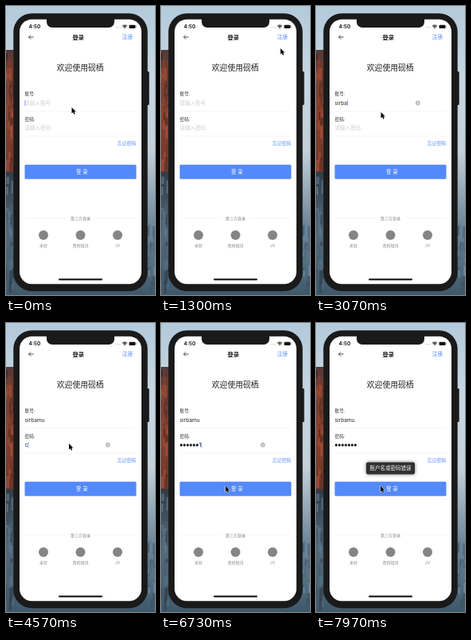
An HTML page with a canvas for the animation above (8000 ms loop, 187x362 px).

```html
<!DOCTYPE html>
<html lang="zh-CN">
<head>
<meta charset="utf-8">
<title>登录</title>
<style>
html, body { margin: 0; width: 100%; height: 100%; overflow: hidden; background: #a9bfce; }
canvas { display: block; width: 187px; height: 362px; }
</style>
</head>
<body>
<canvas id="stage"></canvas>
<script>
const W = 187, H = 362, LOOP = 8000;
const BLUE = '#5489fb', INK = '#222', SHELL = '#1a1a1b';
const FONT = 'Inter, "Noto Sans CJK SC", "Noto Sans CJK", sans-serif';
const USER = { word: 'sirbamu', start: 2430, gap: 160 };
const PASS = { word: 'cabmer1', start: 4570, gap: 280 };
const FOCUS_PASS = 4380, SUBMIT = 7370;
const HOME = { x: 82.5, y: 127 };
const MOVES = [
  { at: 870, ms: 420, x: 150, y: 53 },
  { at: 1930, ms: 270, x: 81.5, y: 133 },
  { at: 3970, ms: 230, x: 79, y: 151 },
  { at: 6530, ms: 190, x: 81, y: 204 }
];
const ARROW = new Path2D('M0 0V7.5L1.7 6L2.9 8.7L4.2 8.1L3 5.5L5.3 5.4Z');

const canvas = document.getElementById('stage');
const g = canvas.getContext('2d');
const dpr = window.devicePixelRatio || 1;
canvas.width = W * dpr;
canvas.height = H * dpr;

const clamp = v => Math.max(0, Math.min(1, v));
const smooth = v => v * v * (3 - 2 * v);

function seeded(seed) {
  return () => (seed = (seed * 16807) % 2147483647) / 2147483647;
}

function box(x, y, w, h, r, fill) {
  g.beginPath();
  g.roundRect(x, y, w, h, r);
  g.fillStyle = fill;
  g.fill();
}

function disc(x, y, r, fill) {
  g.beginPath();
  g.arc(x, y, r, 0, Math.PI * 2);
  g.fillStyle = fill;
  g.fill();
}

function line(x1, y1, x2, y2, color, width) {
  g.beginPath();
  g.moveTo(x1, y1);
  g.lineTo(x2, y2);
  g.strokeStyle = color;
  g.lineWidth = width;
  g.stroke();
}

function text(s, x, y, size, color, align = 'left', weight = 400) {
  g.font = `${weight} ${size}px ${FONT}`;
  g.textAlign = align;
  g.fillStyle = color;
  g.fillText(s, x, y + size * .37);
}

function gradient(y, h, ...colors) {
  const fill = g.createLinearGradient(0, y, 0, y + h);
  colors.forEach((c, i) => fill.addColorStop(i / (colors.length - 1), c));
  return fill;
}

// Random rock streaks inside a rectangle.
function rocks(rand, x, y, w, h, count, hue, sat, dark, light) {
  for (let i = 0; i < count; i++) {
    const l = dark + (light - dark) * rand();
    g.fillStyle = `hsla(${hue}, ${sat}%, ${l}%, .6)`;
    g.fillRect(x + rand() * w, y + rand() * h, 1 + rand() * 3, 4 + rand() * 14);
  }
}

function wallpaper() {
  const rand = seeded(11);
  g.fillStyle = gradient(0, H, '#b3cadb', '#c6d6e1', '#c3d0da', '#71899b', '#3e586b');
  g.fillRect(0, 0, W, H);
  g.fillStyle = gradient(55, 155, '#54393a', '#8c4331', '#6b352c');
  g.fillRect(0, 55, 12, 155);
  rocks(rand, -1, 55, 12, 140, 50, 14, 50, 15, 48);
  g.fillStyle = gradient(208, 154, '#2f3c48', '#526a7b', '#3e586b');
  g.fillRect(0, 208, 12, 154);
  rocks(rand, -1, 208, 12, 140, 30, 207, 20, 20, 55);
  rocks(rand, 176, 270, 11, 80, 24, 207, 22, 22, 65);
}

function phone() {
  box(176.5, 82, 3.2, 42, 1, SHELL);
  box(9.3, 9.2, 168.4, 348, 23, SHELL);
  box(17, 16.8, 153, 331.4, 15.5, '#fff');
  box(51, 16, 85, 11, [0, 0, 7, 7], SHELL);
}

function statusBar() {
  text('4:50', 36, 25.6, 6.6, '#111', 'center', 600);
  for (let i = 0; i < 4; i++) disc(138.2 + i * 1.8, 26.8, .5, '#aaa');
  for (let r = 1.4; r < 5; r += 1.5) {
    g.beginPath();
    g.arc(149, 28.4, r, -Math.PI * .75, -Math.PI * .25);
    g.strokeStyle = '#111';
    g.lineWidth = 1;
    g.stroke();
  }
  box(154.5, 23.8, 8, 4.2, 1.1, '#111');
  box(163, 25.1, .7, 1.6, .3, '#777');
}

function page() {
  line(34.6, 39, 28.6, 39, INK, .8);
  for (const d of [-2.6, 2.6]) line(28.5, 39, 31.1, 39 + d, INK, .8);
  text('登录', 90.8, 39, 7.2, INK, 'center', 600);
  text('注册', 152.5, 39, 6.7, BLUE, 'center');
  text('欢迎使用砚栖', 93.2, 77, 9.8, INK, 'center');
  text('账号:', 23.5, 109.8, 5.7, '#333');
  text('密码:', 23.5, 141.4, 5.7, '#333');
  for (const y of [132, 163]) line(24, y, 163, y, '#e8e8e8', .5);
  text('忘记密码', 163.2, 171.4, 5.9, BLUE, 'right');
  box(23.5, 198.8, 140, 18, 1.5, BLUE);
  text('登 录', 95.3, 208, 6.4, '#fff', 'center');
  for (const x of [24, 111]) line(x, 266, x + 52, 266, '#ececec', .5);
  text('第三方登录', 93.5, 266, 5, '#888', 'center');
  ['禾铃', '青桥短讯', 'JV'].forEach((name, i) => {
    const x = 47 + i * 46.5;
    disc(x, 287, 6, '#858585');
    text(name, x, 300.5, 5, '#888', 'center');
  });
  box(66, 341.6, 55, 2, 1, '#050505');
}

function clearIcon(y) {
  disc(127.8, y, 2.9, '#bcbcbc');
  for (const d of [-1.1, 1.1]) line(127.8 - d, y - 1.1, 127.8 + d, y + 1.1, '#fff', .6);
}

// Fades in, holds and fades out again, counted from the last key press.
function caret(x, y, age) {
  const p = (age + 120) % 720;
  g.globalAlpha = clamp(Math.min(p, 720 - p) / 170);
  g.fillStyle = '#4569e8';
  g.fillRect(x, y - 3.6, .9, 7.2);
  g.globalAlpha = 1;
}

function typing({ word, start, gap }, t) {
  const n = t < start ? 0 : Math.min(word.length, 1 + Math.floor((t - start) / gap));
  return { n, age: n ? t - start - (n - 1) * gap : t };
}

function userField(t) {
  const { n, age } = typing(USER, t), s = USER.word.slice(0, n), y = 121.3;
  if (n) text(s, 23.5, y, 6.6, INK);
  else text('请输入账号', 23.6, y, 6.5, '#cfcfd2');
  if (t >= FOCUS_PASS) return;
  caret(23.5 + (n ? g.measureText(s).width : 0), y, age);
  if (n) clearIcon(121.5);
}

function passField(t) {
  const { n, age } = typing(PASS, t), step = 4, y = 152.7;
  const sent = t >= SUBMIT, dots = sent ? n : Math.max(0, n - 1);
  let end = 23.5 + dots * step;
  for (let i = 0; i < dots; i++) disc(25.4 + i * step, y + .2, 1.55, '#111');
  if (!n) text('请输入密码', 23.6, y, 6.5, '#cfcfd2');
  else if (!sent) {
    const last = PASS.word[n - 1];
    text(last, end, y, 6.6, INK);
    end += g.measureText(last).width;
  }
  if (t < FOCUS_PASS || sent) return;
  caret(end, y, n ? age : t - FOCUS_PASS);
  if (n) clearIcon(y);
}

function toast(t) {
  const a = clamp((t - SUBMIT) / 300);
  if (!a) return;
  g.save();
  g.globalAlpha = a;
  g.shadowColor = 'rgba(0,0,0,.55)';
  g.shadowBlur = 4 * dpr;
  box(63, 174.5, 61, 15, 2.2, '#303030');
  g.shadowColor = 'transparent';
  text('账户名或密码错误', 93.5, 182, 6.5, '#fff', 'center');
  g.restore();
}

function pointer(t) {
  let { x, y } = HOME;
  for (const m of MOVES) {
    const k = smooth(clamp((t - m.at) / m.ms));
    x += (m.x - x) * k;
    y += (m.y - y) * k;
  }
  g.save();
  g.translate(x, y);
  g.lineJoin = 'round';
  g.strokeStyle = '#fff';
  g.lineWidth = 1;
  g.stroke(ARROW);
  g.fillStyle = '#000';
  g.fill(ARROW);
  g.restore();
}

function draw(now) {
  const t = now % LOOP;
  g.setTransform(dpr, 0, 0, dpr, 0, 0);
  wallpaper();
  phone();
  statusBar();
  page();
  userField(t);
  passField(t);
  toast(t);
  pointer(t);
}

const start = performance.now();
function tick() {
  draw(performance.now() - start);
  requestAnimationFrame(tick);
}
tick();
</script>
</body>
</html>
```
